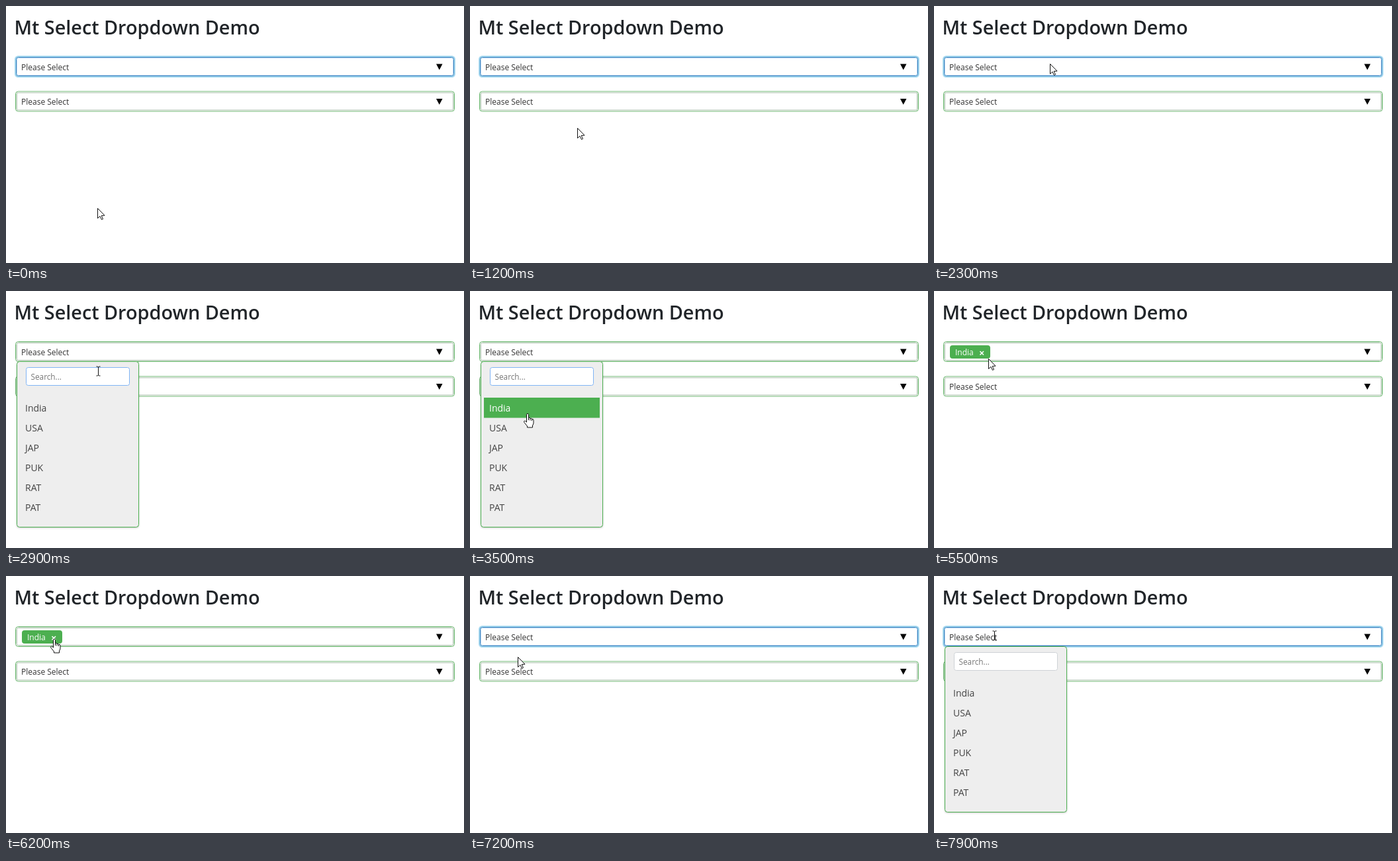
Animation of 692 by 388 pixels, one loop 8 s. Source, as an HTML page with a canvas:

```html
<!DOCTYPE html>
<html lang="en">
<head>
<meta charset="utf-8">
<title>Select Dropdown Demo</title>
<style>
html, body { margin: 0; width: 100%; height: 100%; overflow: hidden; background: #fff; }
canvas { display: block; width: 692px; height: 388px; }
</style>
</head>
<body>
<canvas id="stage" width="692" height="388"></canvas>
<script>
const ctx = document.getElementById('stage').getContext('2d');
const LOOP = 8000, STEP = 100;
const GREEN = '#4caf50';
const FAMILY = '"Open Sans", "Noto Sans", sans-serif';
const ITEMS = ['India', 'USA', 'JAP', 'PUK', 'RAT', 'PAT'];

// Pointer hotspot: [time, x, y]
const TRACK = [
  [0, 138, 305], [100, 138, 303], [500, 147, 273], [1000, 158, 206],
  [1500, 167, 152], [1900, 173, 96], [2100, 175, 87], [2500, 175, 87],
  [2800, 152, 106], [3100, 112, 150], [3300, 97, 174], [3500, 87, 185],
  [4000, 87, 185], [4200, 88, 174], [4400, 89, 175], [4600, 92, 177],
  [4800, 92, 177], [5200, 93, 130], [5600, 78, 93], [6100, 73, 95],
  [6600, 73, 95], [7100, 72, 122], [7200, 72, 122], [7300, 76, 113],
  [7600, 91, 90], [8000, 91, 90]
];

const ARROW = new Path2D('M0 0V15L3.5 11.8L6 17L8 16L5.7 11L10.5 10.7Z');
const HAND = new Path2D('M-1.5 1.5Q-1.5 .2 0 .2Q1.5 .2 1.5 1.5V6.5Q4 5.5 4 7.5Q6.5 6.5 6.5 8.5' +
  'Q9 7.8 9 10V14Q9 16 7.5 18V21H-.5V19L-5 13.5Q-6 11.5 -4.5 11Q-3.5 10.8 -1.5 13Z');
const KNUCKLES = new Path2D('M1.5 6.5V10M4 7.5V10.5M6.5 8.5V11');
const BEAM = new Path2D('M-3 -7H-1L0 -6L1 -7H3M0 -6V6M-3 7H-1L0 6L1 7H3');

function text(str, x, y, size, color, weight = 400) {
  ctx.font = `${weight} ${size}px ${FAMILY}`;
  ctx.fillStyle = color;
  ctx.fillText(str, x, y);
}

function round(x, y, w, h, r, fill, stroke, line = 1) {
  ctx.beginPath();
  ctx.roundRect(x, y, w, h, r);
  if (fill) { ctx.fillStyle = fill; ctx.fill(); }
  if (stroke) { ctx.strokeStyle = stroke; ctx.lineWidth = line; ctx.stroke(); }
}

function selectBox(y, focused) {
  if (focused) {
    round(14.5, y + .5, 663, 30, 4, '#fff', '#a5d8f0', 3);
    round(15.5, y + 1.5, 661, 28, 3, null, '#3c85bd');
    round(16.5, y + 2.5, 659, 26, 3, null, '#b5d3f3');
  } else {
    round(14.5, y + .5, 663, 30, 4, '#fff', '#62b166');
    round(15.5, y + 1.5, 661, 28, 3, null, '#d3ead4');
    round(16.5, y + 2.5, 659, 26, 2, null, '#b5c4b6');
  }
  ctx.fillStyle = '#000';
  ctx.beginPath();
  ctx.moveTo(650, y + 11.5);
  ctx.lineTo(659.5, y + 11.5);
  ctx.lineTo(654.75, y + 20.5);
  ctx.fill();
}

function tag() {
  round(24, 82, 61, 20, 4, GREEN);
  text('India', 32, 97, 12, '#fff');
  ctx.strokeStyle = '#fff';
  ctx.lineWidth = 1.6;
  ctx.beginPath();
  ctx.moveTo(69.5, 91); ctx.lineTo(75, 96.5);
  ctx.moveTo(75, 91); ctx.lineTo(69.5, 96.5);
  ctx.stroke();
}

function dropdown(searchFocused, hover) {
  ctx.save();
  ctx.shadowColor = 'rgba(0,0,0,.28)';
  ctx.shadowBlur = 3;
  ctx.shadowOffsetY = 1;
  round(16.5, 106.5, 184, 250, 4, '#eee');
  ctx.restore();
  round(16.5, 106.5, 184, 250, 4, null, GREEN);
  round(30.5, 115.5, 156, 27, 3, '#fff', searchFocused ? '#80b4f5' : '#ced2d6');
  text('Search...', 37.5, 134, 11.8, '#777');
  ITEMS.forEach((name, i) => {
    const y = 161 + i * 30;
    if (i === hover) {
      ctx.fillStyle = GREEN;
      ctx.fillRect(21, y, 175, 30.5);
    }
    text(name, 29, y + 21, 14, i === hover ? '#fff' : '#444');
  });
}

function pointerAt(t) {
  const i = TRACK.findIndex(p => p[0] > t);
  const [t0, x0, y0] = TRACK[i - 1], [t1, x1, y1] = TRACK[i];
  const k = (t - t0) / (t1 - t0);
  return [Math.round(x0 + (x1 - x0) * k), Math.round(y0 + (y1 - y0) * k)];
}

function pointer(x, y, shape) {
  ctx.save();
  ctx.translate(x, y);
  ctx.lineWidth = 1;
  ctx.lineJoin = 'round';
  ctx.strokeStyle = '#111';
  ctx.fillStyle = '#fff';
  if (shape === BEAM) {
    ctx.translate(.5, 0);
  } else {
    if (shape === ARROW) ctx.translate(.5, .5);
    ctx.fill(shape);
  }
  ctx.stroke(shape);
  if (shape === HAND) ctx.stroke(KNUCKLES);
  ctx.restore();
}

const inside = (x, y, l, t, r, b) => x >= l && x <= r && y >= t && y <= b;

function draw(t) {
  const open = (t >= 2600 && t < 4000) || t >= 7800;
  const tagged = t >= 4000 && t < 6500;
  const focused = t < 2800 || t >= 6500;
  const [x, y] = pointerAt(t);
  const row = open && inside(x, y, 21, 161, 196, 340) ? Math.floor((y - 161) / 30) : -1;

  ctx.fillStyle = '#fff';
  ctx.fillRect(0, 0, 692, 388);
  text('Mt Select Dropdown Demo', 12.5, 42.5, 28.8, '#212529', 600);

  selectBox(76, focused);
  selectBox(128.5, false);
  if (tagged) tag();
  else text('Please Select', 23, 96.5, 12, '#333');
  text('Please Select', 23, 149, 12, '#333');
  if (open) dropdown(!focused, row);

  let shape = ARROW;
  if (row >= 0 || (tagged && inside(x, y, 67, 88, 78, 99))) shape = HAND;
  else if (open && inside(x, y, 30, 115, 187, 143)) shape = BEAM;
  else if (!tagged && inside(x, y, 23, 84, 95, 100)) shape = BEAM;
  pointer(x, y, shape);
}

const start = performance.now();
function frame() {
  const t = (performance.now() - start) % LOOP;
  draw(Math.floor(t / STEP) * STEP);
  requestAnimationFrame(frame);
}
frame();
</script>
</body>
</html>
```
